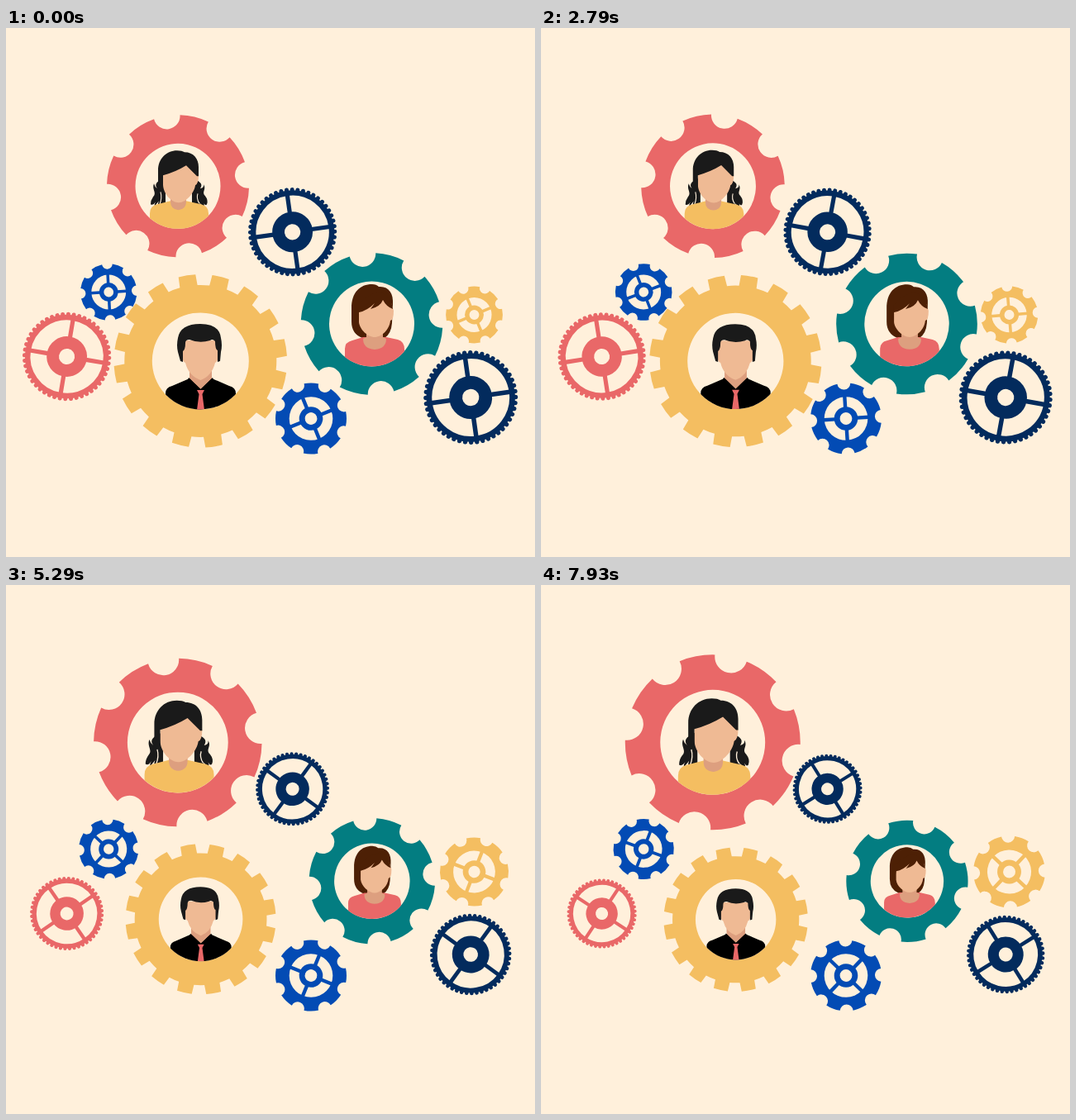
Animation, 640 px wide and 640 px high, one loop 8000 ms. Source, as an HTML page:

```html
<!DOCTYPE html>
<html lang="en">
<head>
<meta charset="utf-8">
<title>Team gears</title>
<style>
html, body { margin: 0; width: 100%; height: 100%; overflow: hidden; background: #fff0db; }
svg { display: block; width: 100%; height: 100%; }
</style>
</head>
<body>
<svg id="stage" viewBox="0 0 640 640">
  <defs>
    <clipPath id="clip51"><circle r="51.5"/></clipPath>
    <clipPath id="clip58"><circle r="58.5"/></clipPath>

    <g id="curlyWoman" clip-path="url(#clip51)">
      <g transform="translate(-208 -191)">
        <g fill="#1a1a1a">
          <path d="M186 184C181 187 180 190 183 194Q180 192 179 188C176 195 183 199 178 204Q175 208 175 213Q178 215 181 210Q179 214 180 215L185 209Q183 213 185 215H193V180Z"/>
          <path d="M231 184C236 187 238 189 235 194Q240 193 239 189C243 195 236 198 241 203Q245 208 243 213Q241 216 238 209Q241 214 239 216L233 210Q236 213 234 215H225V184Z"/>
        </g>
        <path d="M186 213Q189 205 187 198M234 212Q230 206 232 200" fill="none" stroke="#fff0db" stroke-width="1.1"/>
        <path d="M174 244V224Q174 215 183 213L199 209H218L236 213Q245 215 245 224V244Z" fill="#f4be61"/>
        <path d="M199 201H218V210Q218 219 208.500 220Q199 219 199 210Z" fill="#dd9f7f"/>
        <path d="M190 171V189C190 200 200 211 209 211S228 199 229 190Q233 188 233 178L218 165Z" fill="#efba94"/>
        <path d="M184 193V172C184 158 194 148 207 148Q213 148 216 150C227 150 233 158 233 168V179H231L218 166Q205 174 190 178V193Z" fill="#1a1a1a"/>
      </g>
    </g>

    <g id="bobWoman" clip-path="url(#clip51)">
      <g transform="translate(-442.500 -358)">
        <path d="M418 339C418 320 428 310 443 310Q448 310 451 313C463 312 469 321 468 334L467 357Q466 370 458 375H431Q418 370 418 355Z" fill="#4d2005"/>
        <path d="M410 410V388Q410 380 419 378L432 374H460L474 377Q482 379 482 389V410Z" fill="#e96868"/>
        <path d="M436 364H456V374L460 376Q460 388 446 389Q432 388 432 376L436 374Z" fill="#dd9f7f"/>
        <path d="M427 340V356C428 365 438 374 446 374S464 365 465 354Q469 354 469 342L466 333L452 324Z" fill="#efba94"/>
        <path d="M426 350V335Q437 322 452 319Q466 325 468 340Q460 337 456 329Q453 337 441 340L446 333Q437 342 427 344Z" fill="#4d2005"/>
      </g>
    </g>

    <g id="man" clip-path="url(#clip58)">
      <g transform="translate(-235.300 -403)">
        <path d="M193 462V442Q193 435 201 433L222 424H249L270 433Q278 435 278 442V462Z" fill="#000"/>
        <path d="M222 408H249V424L235.500 437L222 424Z" fill="#dd9f7f"/>
        <path d="M214 378H256V389Q259 390 257 398Q256 404 253 405Q249 421 235.500 426Q221 421 217 405Q214 404 213 398Q212 390 214 389Z" fill="#efba94"/>
        <path d="M208 392Q206 384 208 375Q211 358 235 358Q258 358 260 375Q262 384 260 392L259 403L256 404V390Q253 389 253 379Q250 376 247 378Q234 382 222 377Q217 377 217 381Q217 389 214 391V404L211 403Z" fill="#1a1a1a"/>
        <path d="M221 423L235.500 437L250 423L253 430L241 441L235.500 438L230 441L218 430Z" fill="#000"/>
        <path d="M231 438H240L237.500 443L240 462H231L233.500 443Z" fill="#e96868"/>
      </g>
    </g>
  </defs>
</svg>
<script>
const NS = "http://www.w3.org/2000/svg";
const stage = document.getElementById("stage");
const RED = "#e96868", NAVY = "#032b5d", BLUE = "#034bb4", YELLOW = "#f4be61", TEAL = "#037d81";

function add(parent, tag, attrs) {
  const node = document.createElementNS(NS, tag);
  for (const key in attrs) node.setAttribute(key, attrs[key]);
  return parent.appendChild(node);
}

// Angles are in degrees, clockwise from the top.
function polar(r, deg) {
  const a = deg * Math.PI / 180;
  return (r * Math.sin(a)).toFixed(3) + " " + (-r * Math.cos(a)).toFixed(3);
}

const circlePath = r => `M0 ${-r}A${r} ${r} 0 1 1 0 ${r}A${r} ${r} 0 1 1 0 ${-r}Z`;

function notchedPath(R, hole) {
  const n = R * 0.186;
  const half = 2 * Math.asin(n / (2 * R)) * 180 / Math.PI;
  let d = "M" + polar(R, half);
  for (let a = 45; a <= 360; a += 45) {
    d += `A${R} ${R} 0 0 1 ${polar(R, a - half)}A${n} ${n} 0 0 0 ${polar(R, a + half)}`;
  }
  return d + "Z" + circlePath(hole);
}

function toothedPath(R, root, teeth, hole) {
  const step = 360 / teeth;
  let d = "";
  for (let i = 0; i < teeth; i++) {
    const a = i * step;
    d += (i ? "L" : "M") + polar(root, a - 6.7) + "L" + polar(R, a - 5.7) +
      `A${R} ${R} 0 0 1 ${polar(R, a + 5.7)}L${polar(root, a + 6.7)}` +
      `A${root} ${root} 0 0 1 ${polar(root, a + step - 6.7)}`;
  }
  return d + "Z" + circlePath(hole);
}

function addWheel(g, color, hubOuter, hubHole, rim, spoke) {
  add(g, "circle", { r: (hubOuter + hubHole) / 2, fill: "none", stroke: color, "stroke-width": hubOuter - hubHole });
  let d = "";
  for (let a = 0; a < 360; a += 90) d += "M" + polar(hubOuter - 1, a) + "L" + polar(rim + 1, a);
  add(g, "path", { d, stroke: color, "stroke-width": spoke });
}

const shapes = {
  ring(g, color, R) {
    add(g, "path", { d: notchedPath(R, 51.5), fill: color, "fill-rule": "evenodd" });
  },
  toothed(g, color, R) {
    add(g, "path", { d: toothedPath(R, 92, 16, 58.5), fill: color, "fill-rule": "evenodd" });
  },
  cog(g, color, R) {
    const k = R / 43;
    add(g, "path", { d: notchedPath(R, 26.3 * k), fill: color, "fill-rule": "evenodd" });
    addWheel(g, color, 14.3 * k, 7.4 * k, 26.3 * k, 4.4 * k);
  },
  beaded(g, color, R) {
    const k = R / 53.7;
    add(g, "circle", { r: 47.4 * k, fill: "none", stroke: color, "stroke-width": 6.4 * k });
    let beads = "";
    for (let i = 0; i < 48; i++) beads += `M${polar(49.5 * k, i * 7.5)}L${polar(51.2 * k, i * 7.5)}`;
    add(g, "path", { d: beads, stroke: color, "stroke-width": 5 * k, "stroke-linecap": "round" });
    addWheel(g, color, 24.4 * k, 9.6 * k, 44.2 * k, 5.2 * k);
  }
};

// from/to: centre at rest and at full growth; grow: scale at full growth; spin: 1 is clockwise.
const gears = [
  { shape: "cog",     color: BLUE,   R: 34.2,  from: [124.2, 319.5], grow: 1.08,  spin: 1,  angle: -3 },
  { shape: "beaded",  color: RED,    R: 53.7,  from: [73.6, 397.5],  grow: 0.755, spin: 1,  angle: 9.5 },
  { shape: "beaded",  color: NAVY,   R: 53.7,  from: [346.6, 246.8], grow: 0.752, spin: -1, angle: -8 },
  { shape: "beaded",  color: NAVY,   R: 57,    from: [562.2, 447],   grow: 0.805, spin: -1, angle: -8 },
  { shape: "cog",     color: YELLOW, R: 34.4,  from: [566.5, 347],   grow: 1.3,   spin: -1, angle: -23 },
  { shape: "cog",     color: BLUE,   R: 43,    from: [369, 472.5],   grow: 1,     spin: -1, angle: -22 },
  { shape: "ring",    color: RED,    R: 86,    from: [208, 191.3], to: [207.7, 190.2], grow: 1.265, spin: -1, angle: -9, person: "curlyWoman" },
  { shape: "ring",    color: TEAL,   R: 85.8,  from: [442.5, 358], to: [443, 358.4],   grow: 0.838, spin: 1,  angle: -7.5, person: "bobWoman" },
  { shape: "toothed", color: YELLOW, R: 104.8, from: [235.3, 402.9], to: [235.7, 405], grow: 0.809, spin: -1, angle: -9, person: "man" }
];

for (const gear of gears) {
  gear.group = add(stage, "g", {});
  gear.rotor = add(gear.group, "g", {});
  shapes[gear.shape](gear.rotor, gear.color, gear.R);
  if (gear.person) add(gear.group, "use", { href: "#" + gear.person });
}

const LOOP = 8000, FPS = 14, TURN = 360 / 14;

function growth(t) {
  if (t < 2.2) return 0;
  if (t < 7.15) return (1 - Math.cos(Math.PI * (t - 2.2) / 4.95)) / 2;
  return (1 + Math.cos(Math.PI * (t - 7.15) / 3.4)) / 2;
}

function draw(t) {
  const p = growth(t);
  for (const { group, rotor, from, to = from, grow, spin, angle } of gears) {
    const [x, y] = from.map((v, i) => v + (to[i] - v) * p);
    group.setAttribute("transform", `translate(${x} ${y}) scale(${1 + (grow - 1) * p})`);
    rotor.setAttribute("transform", `rotate(${angle + spin * TURN * t})`);
  }
}

const start = performance.now();
function tick() {
  const ms = (performance.now() - start) % LOOP;
  draw(Math.min(Math.floor((ms + 5) * FPS / 1000), LOOP * FPS / 1000 - 1) / FPS);
  requestAnimationFrame(tick);
}
tick();
</script>
</body>
</html>
```
